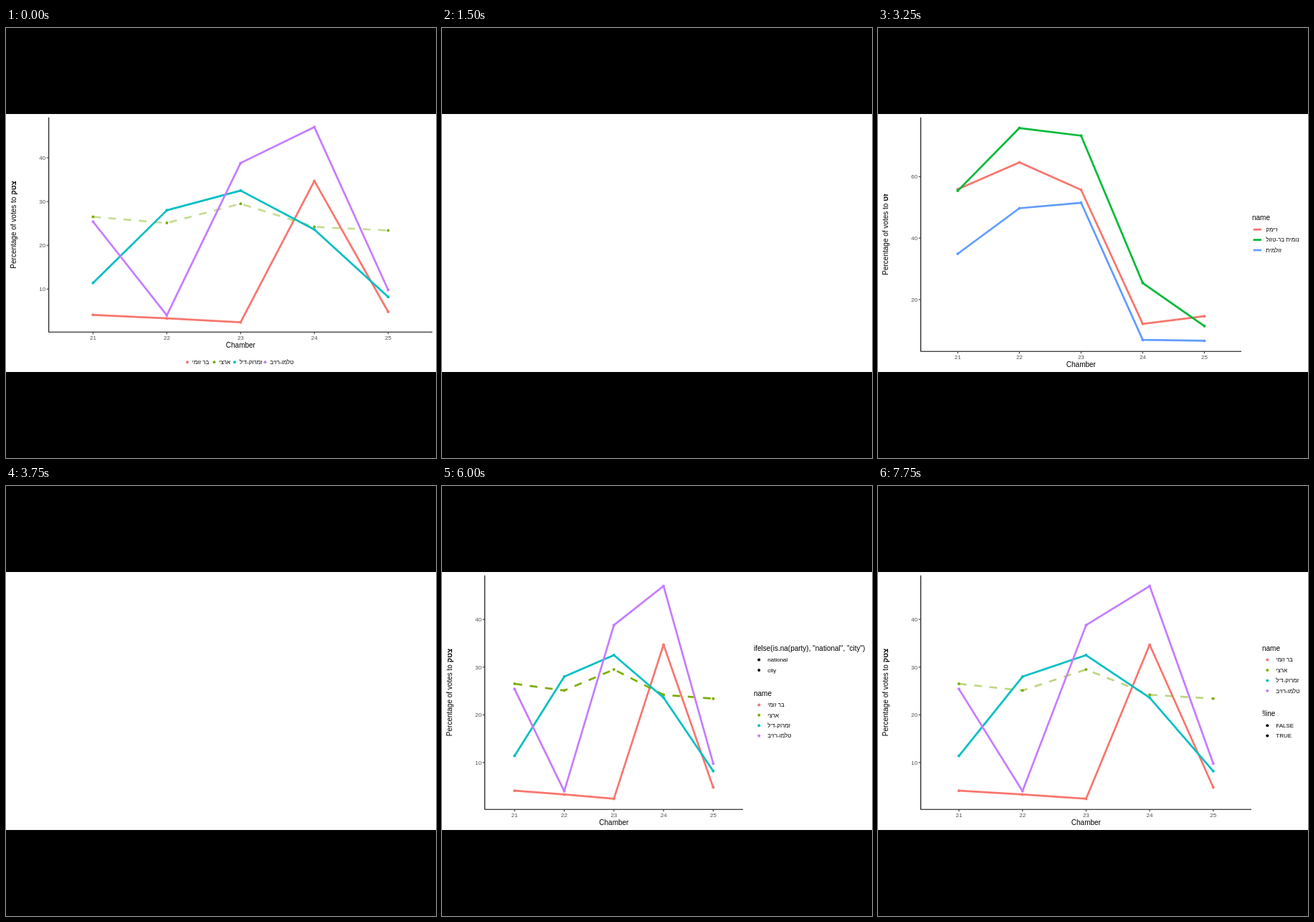
These frames come from a looping animation (600x600 px, 8000 ms). An HTML page with a canvas:

```html
<!DOCTYPE html>
<html lang="en">
<head>
<meta charset="utf-8">
<style>
  html, body { margin: 0; width: 100%; height: 100%; overflow: hidden; background: #000; }
  canvas { display: block; }
</style>
</head>
<body>
<canvas id="stage" width="600" height="600"></canvas>
<script>
const ctx = document.getElementById('stage').getContext('2d');
const LOOP = 8000, LEFT = 59.7, TOP = 124.7;
const FONT = '"Liberation Sans", Arial, sans-serif';

const series = (name, color, values) => ({ name, color, values });

const towns = {
  ballot: 'זט', ticks: [20, 40, 60],
  series: [
    series("ז'ימק", '#f8766d', [55.9, 64.6, 55.7, 12.1, 14.6]),
    series('נומית בר-טזול', '#00ba38', [55.4, 75.8, 73.3, 25.4, 11.4]),
    series('זולמית', '#619cff', [34.9, 49.7, 51.5, 6.9, 6.6])
  ]
};
const villages = {
  ballot: 'צטק', ticks: [10, 20, 30, 40],
  series: [
    series('בר זומי', '#f8766d', [4.1, 3.3, 2.4, 34.7, 4.8]),
    series('ארצי', '#7cae00', [26.5, 25.1, 29.5, 24.2, 23.4]),
    series("זמרוק-ד'ל", '#00bfc4', [11.4, 28, 32.5, 23.6, 8.2]),
    series('טלמו-רזיב', '#c77cff', [25.4, 4, 38.8, 47, 9.8])
  ]
};

const names = data => ({ title: 'name', items: data.series.map(s => [s.name, s.color]) });
const black = (title, ...labels) => ({ title, items: labels.map(l => [l, '#000']) });

// dashed: 'none', 'national' (second series) or 'all'
const plot = (data, right, options) => ({
  data, right, bottom: 451.3, width: 2.7, dots: true, dashed: 'none', fade: 1,
  key: 'dot', legend: [names(data)], ...options
});
const townPlot = options => plot(towns, 507, { width: 3.8, dots: false, key: 'line', cap: 'round', ...options });
const villagePlot = (right, options) => plot(villages, right, { dashed: 'national', ...options });

const solid = villagePlot(521, { dashed: 'none', key: 'line' });
const dashedAll = villagePlot(431, {
  dashed: 'all', key: 'line',
  legend: [names(villages), black('ifelse(is.na(id), "solid", "dashed")', 'dashed')]
});
const byCity = villagePlot(420, {
  legend: [black('ifelse(is.na(party), "national", "city")', 'national', 'city'), names(villages)]
});
const byLine = villagePlot(521, { fade: 0.5, legend: [names(villages), black('!line', 'FALSE', 'TRUE')] });
const wide = villagePlot(595, { legend: [] });
const finished = villagePlot(595, { bottom: 424.3, fade: 0.43, legend: [], row: [253, 290.5, 319, 361.5] });

// [start in ms, plot]; null leaves the page blank
const scenes = [
  [0, finished],
  [500, townPlot({ width: 1 })],
  [750, townPlot({ width: 1.4 })],
  [1000, townPlot({ width: 2 })],
  [1250, townPlot({ width: 2.7 })],
  [1500, null],
  [1750, townPlot({ width: 2 })],
  [2000, townPlot({ width: 2.7 })],
  [2250, townPlot({ cap: 'butt' })],
  [2500, townPlot()],
  [2750, townPlot({ width: 3.2 })],
  [3000, townPlot({ width: 2.7 })],
  [3250, townPlot({ width: 2.7, dots: true })],
  [3500, townPlot({ width: 2.7, key: 'dot', dots: true })],
  [3750, null],
  [4250, solid],
  [4750, { ...dashedAll, dots: false }],
  [5000, dashedAll],
  [5250, { ...dashedAll, dashed: 'national' }],
  [5500, wide],
  [5750, { ...byCity, key: 'line' }],
  [6000, byCity],
  [6250, { ...byCity, fade: 0.8 }],
  [6500, { ...byCity, fade: 0.5 }],
  [6750, villagePlot(521)],
  [7000, villagePlot(521, { fade: 0.5 })],
  [7250, { ...byLine, fade: 0.8 }],
  [7500, { ...byLine, fade: 0.65 }],
  [7750, byLine]
];

function text(str, x, y, size = 8, color = '#000', align = 'left', weight = '') {
  ctx.font = `${weight} ${size}px ${FONT}`;
  ctx.fillStyle = color;
  ctx.textAlign = align;
  ctx.fillText(str, x, y + size * 0.35);
  return ctx.measureText(str).width;
}

function line(points, color, width) {
  ctx.beginPath();
  points.forEach(p => ctx.lineTo(...p));
  ctx.strokeStyle = color;
  ctx.lineWidth = width;
  ctx.stroke();
}

function dot(x, y, color) {
  ctx.beginPath();
  ctx.arc(x, y, 2, 0, 7);
  ctx.fillStyle = color;
  ctx.fill();
}

function yTitle(ballot, middle) {
  const label = 'Percentage of votes to ';
  ctx.save();
  ctx.translate(10.8, middle);
  ctx.rotate(-Math.PI / 2);
  ctx.font = `bold 10px ${FONT}`;
  const ballotWidth = ctx.measureText(ballot).width;
  ctx.font = `10px ${FONT}`;
  const start = -(ctx.measureText(label).width + ballotWidth) / 2;
  const width = text(label, start, 0, 10);
  text(ballot, start + width, 0, 10, '#000', 'left', 'bold');
  ctx.restore();
}

function drawLegend({ legend, right, key, width }) {
  const x = right + 15;
  const step = 14.4, head = 16.4, gap = 32;
  const height = legend.reduce((h, g) => h + head + (g.items.length - 1) * step, (legend.length - 1) * gap);
  let y = 287.4 - height / 2;
  for (const { title, items } of legend) {
    text(title, x, y, 10);
    y += head;
    items.forEach(([label, color], i) => {
      const ky = y + i * step;
      if (key === 'line') line([[x + 1.6, ky], [x + 13, ky]], color, width);
      else dot(x + 7.3, ky, color);
      text(label, x + 19.3, ky);
    });
    y += (items.length - 1) * step + gap;
  }
}

function drawPlot(p) {
  const { data, right, bottom } = p;
  const all = data.series.flatMap(s => s.values);
  const min = Math.min(...all), max = Math.max(...all), pad = (max - min) * 0.05;
  const px = i => LEFT + (right - LEFT) * (i + 0.6) / 5.2;
  const py = v => bottom - (bottom - TOP) * (v - min + pad) / (max - min + 2 * pad);

  ctx.lineJoin = 'round';
  data.series.forEach((s, i) => {
    const points = s.values.map((v, k) => [px(k), py(v)]);
    const national = p.dashed === 'national' && i === 1;
    const dashed = national || p.dashed === 'all';
    ctx.lineCap = p.cap || 'butt';
    ctx.setLineDash(dashed ? [10.7, 10.7] : []);
    ctx.globalAlpha = national ? p.fade : 1;
    line(points, s.color, p.width);
    ctx.globalAlpha = 1;
    ctx.setLineDash([]);
    if (p.dots) points.forEach(([x, y]) => dot(x, y, s.color));
  });

  ctx.lineCap = 'butt';
  line([[LEFT, TOP], [LEFT, bottom], [right, bottom]], '#000', 1.1);
  for (const v of data.ticks) {
    line([[LEFT - 3, py(v)], [LEFT, py(v)]], '#333', 1.1);
    text(v, LEFT - 4.6, py(v), 8, '#4d4d4d', 'right');
  }
  for (let i = 0; i < 5; i++) {
    line([[px(i), bottom], [px(i), bottom + 3]], '#333', 1.1);
    text(21 + i, px(i), bottom + 8, 8, '#4d4d4d', 'center');
  }
  text('Chamber', (LEFT + right) / 2, bottom + 18, 10, '#000', 'center');
  yTitle(data.ballot, (TOP + bottom) / 2);
  drawLegend(p);
  if (p.row) data.series.forEach((s, i) => {
    dot(p.row[i], 466.3, s.color);
    text(s.name, p.row[i] + 6.8, 466.3);
  });
}

function render(now) {
  const t = now % LOOP;
  const scene = scenes.findLast(([start]) => start <= t)[1];
  ctx.fillStyle = '#000';
  ctx.fillRect(0, 0, 600, 600);
  ctx.fillStyle = '#fff';
  ctx.fillRect(0, 120, 600, 360);
  if (scene) drawPlot(scene);
  requestAnimationFrame(render);
}
render(0);
</script>
</body>
</html>
```
